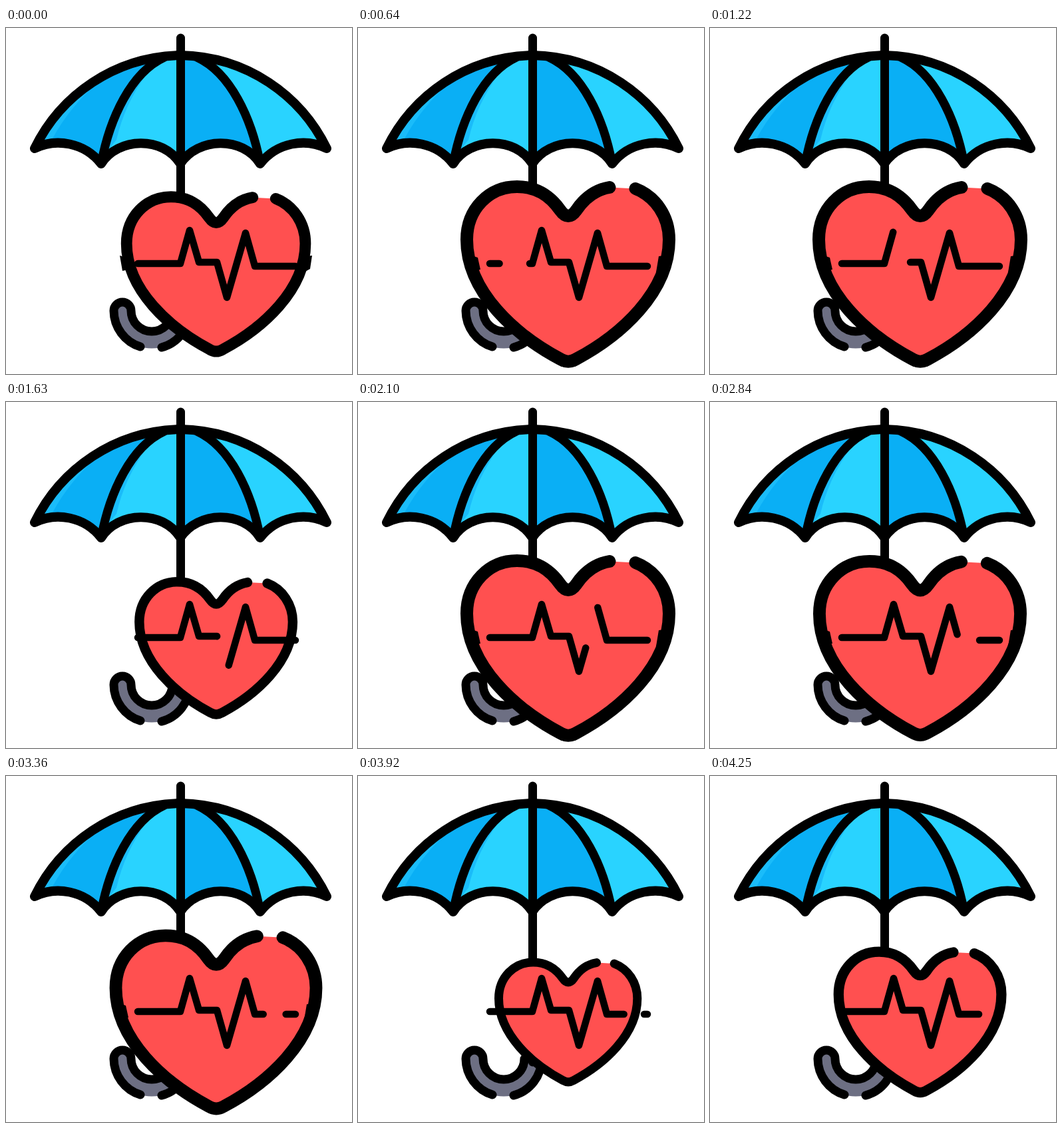
Write an HTML page that moves like this. It is 520 px wide and 520 px high and loops after 4.28 s.

```html
<!DOCTYPE html>
<html lang="en">
<head>
<meta charset="utf-8">
<title>Heart under an umbrella</title>
<style>
html, body { margin: 0; width: 100%; height: 100%; overflow: hidden; background: #fff; }
svg { display: block; width: 100vw; height: 100vh; }
.line { fill: none; stroke: #000; stroke-linecap: round; stroke-linejoin: round; }
</style>
</head>
<body>
<svg viewBox="0 0 520 520">
  <defs>
    <path id="canopy" d="M43 181C82 101 163 43 262.5 41C362 43 443 101 482 181C450 165 407 172 382 204C356 162 288 164 262 204C236 162 168 164 143 204C118 172 75 165 43 181Z"/>
  </defs>
  <!-- handle -->
  <path d="M175 416V425A44 44 0 0 0 263 425" fill="none" stroke="#6d6f83" stroke-width="25"/>
  <g class="line" stroke-width="13">
    <path d="M202 479A57 57 0 0 1 162 425A13 13 0 0 1 188 425A31 31 0 0 0 250 425"/>
    <path d="M234 480A57 57 0 0 0 276 425"/>
  </g>
  <!-- umbrella -->
  <use href="#canopy" fill="#29d3ff"/>
  <path fill="#0aaff5" d="M43 181C82 101 163 43 262.5 41L238 44C188 67 156 135 143 204C118 172 75 165 43 181Z"/>
  <path fill="#0aaff5" d="M262 41L287 44C337 67 369 135 382 204C356 162 288 164 262 204Z"/>
  <path fill="#1abcfa" d="M148 190L166 168Q178 115 212 68L185 85ZM56 168Q88 112 140 80Q96 118 70 166Z"/>
  <g class="line" stroke-width="14">
    <use href="#canopy"/>
    <path d="M143 204C156 135 188 67 238 44M382 204C369 135 337 67 287 44" stroke-width="13"/>
    <path d="M262.5 15V430" stroke-width="13"/>
  </g>
  <path id="heart" class="line" style="fill:#ff5050" stroke-width="19" d="M378 239.5C357 243 340 256 328 274Q316 291 304 274C288 251 268 238.5 239 238.5C197 238.5 163.5 272 163.5 318C163.5 397 237 462 305 498Q316 504.5 327 498C395 462 467.5 397 467.5 318C467.5 283 447 253 417 241.5"/>
  <path id="flecks" d="M171 342L180 345L184 363L175 365ZM460 342L452 343L448 367L457 362Z"/>
  <!-- pulse line, split by a travelling gap -->
  <polyline id="before" class="line" stroke-width="10.5"/>
  <polyline id="after" class="line" stroke-width="10.5"/>
</svg>
<script>
const LOOP = 4280, SLOW = 2100;   // steady until SLOW, then braking to a stop
const STEP = 57.99;               // the picture advances in even steps of the clock
const BEAT = 292;
const $ = id => document.getElementById(id);

const wave = [[198, 354], [262, 354], [276, 304], [290, 352], [317, 352],
              [332, 405], [360, 308], [374, 358], [435, 358]];
const dist = [0];
for (let i = 1; i < wave.length; i++) {
  dist.push(dist[i - 1] + Math.hypot(wave[i][0] - wave[i - 1][0], wave[i][1] - wave[i - 1][1]));
}
const total = dist[dist.length - 1];

// clock value, gap start, gap end along the pulse line
const gap = [[340, -36, 0], [1218, 113, 177], [2088, 285, 350], [2668, 392, 432], [3190, 431, 460]];

function clock(t) {
  if (t > SLOW) {
    const rest = LOOP - SLOW, x = (t - SLOW) / rest;
    t = SLOW + rest / 2 * (1 - (1 - x) ** 2);
  }
  return Math.floor(t / STEP) * STEP;
}

function mix(a, b, k) {
  return a.map((v, i) => v + (b[i] - v) * k);
}

// interpolates rows whose position is given by at(i)
function along(rows, at, pos) {
  let i = 1;
  while (i < rows.length - 1 && at(i) < pos) i++;
  const k = (pos - at(i - 1)) / (at(i) - at(i - 1));
  return mix(rows[i - 1], rows[i], Math.max(0, Math.min(1, k)));
}

function part(id, a, b) {
  const point = d => along(wave, i => dist[i], d);
  const inner = wave.filter((p, i) => dist[i] > a && dist[i] < b);
  $(id).setAttribute("points", b - a > 0.5 ? [point(a), ...inner, point(b)].join(" ") : "");
}

function draw(time) {
  const w = clock(time);
  const swing = Math.cos(2 * Math.PI * (w / BEAT - 0.217));
  const size = Math.min(1, 0.85 + 0.165 * swing);
  $("heart").setAttribute("transform", `translate(316 370) scale(${size}) translate(-316 -370)`);
  $("flecks").setAttribute("visibility", size > 0.86 ? "visible" : "hidden");

  const [, from, to] = along(gap, i => gap[i][0], w);
  part("before", 0, from);
  part("after", to, total);
}

const start = performance.now();
function tick() {
  draw((performance.now() - start) % LOOP);
  requestAnimationFrame(tick);
}
tick();
</script>
</body>
</html>
```
